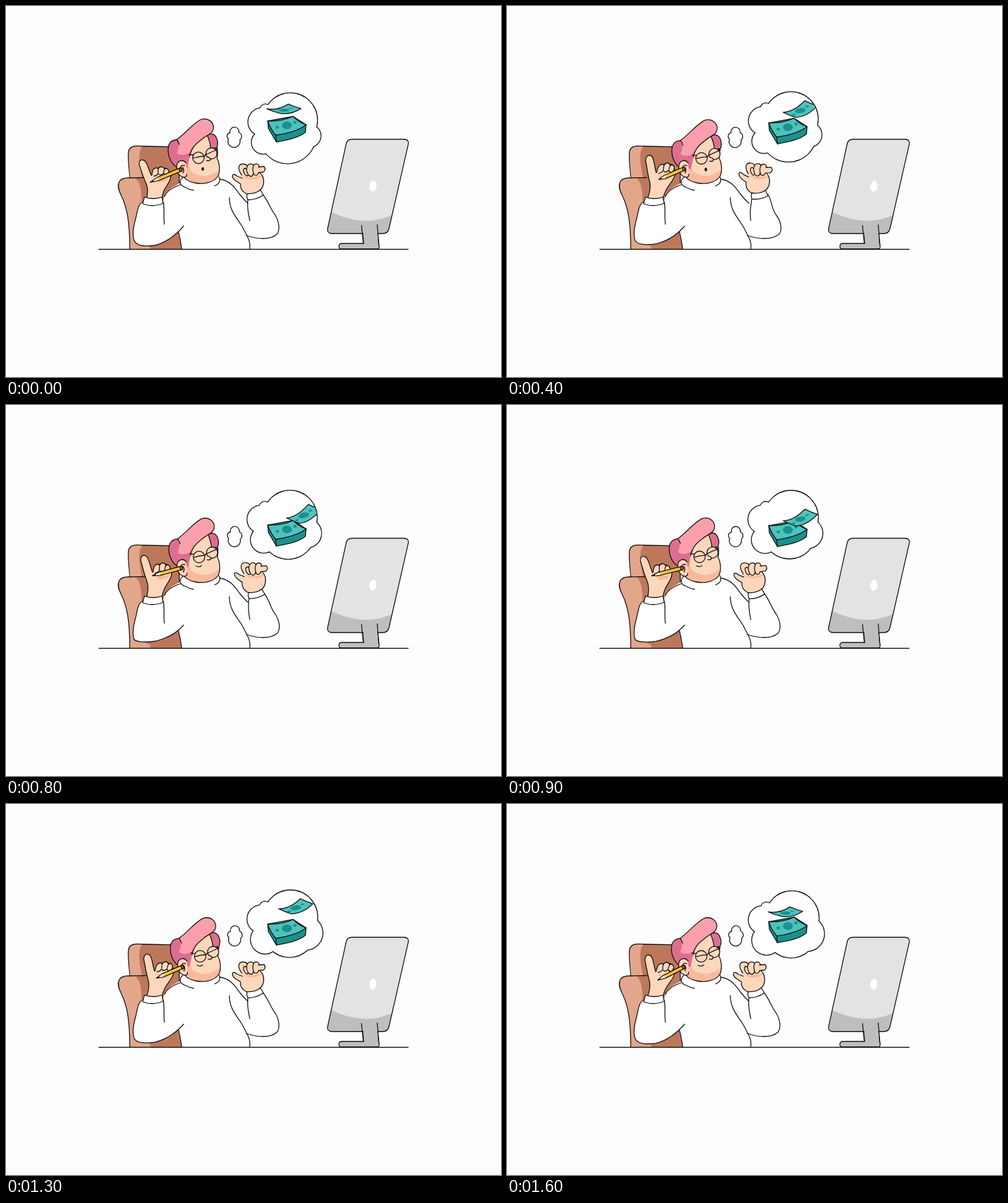
Animation, 800 px wide and 600 px high, one loop 1700 ms. Source, as an HTML page:

```html
<!DOCTYPE html>
<html lang="en">
<head>
<meta charset="utf-8">
<title>Daydream at the desk</title>
<style>
  html, body { margin: 0; width: 100%; height: 100%; overflow: hidden; background: #fdfdfd; }
  svg { display: block; width: 100vw; height: 100vh; }
  .ink { fill: none; stroke: #0b0b0b; stroke-width: 1.3; stroke-linecap: round; stroke-linejoin: round; }
  .w { fill: #fff; }
  .skin { fill: #fdd7bb; }
  .blush { fill: #f9b99c; stroke: none; }
  .pink { fill: #fb9fac; }
  .rose { fill: #dc6f8f; }
  .teal { fill: #4ec2bd; }
  .deep { fill: #1b918c; }
  .tan { fill: #e2a68b; }
  .brown { fill: #bd785c; }
  .grey { fill: #bebebe; }
  .flat { stroke: none; }
</style>
</head>
<body>
<svg viewBox="0 0 800 600">
  <defs>
    <path id="screen" d="M559 215.500H643Q652 216 650 224L619 360Q617 368 609 368H526Q518 367 520 359L550 222Q552 215.500 559 215.500Z"/>
    <path id="skull" d="M280 240L300 224L327 207Q338 212 341 229Q343 237 341 246C346 255 346 270 342 276C335 286 318 289 305 286Q291 283 286 274Z"/>
    <clipPath id="bubbleClip"><path id="bubbleMask"/></clipPath>
    <clipPath id="screenClip"><use href="#screen"/></clipPath>
    <clipPath id="faceClip"><use href="#skull"/></clipPath>
  </defs>
  <g class="ink">
    <!-- chair -->
    <path class="brown" d="M201 290C200 268 196 246 198 235Q200 226.500 211 226.500L280 228V300Z"/>
    <path class="tan flat" d="M201 283C200 268 197.500 246 198.800 236Q201 227.200 211 227.200H220C213 235 215 258 220 278Z"/>
    <path class="brown flat" d="M208 279L226 277.500L290 300V364H278Q282 378 284 393H200L208 360Z"/>
    <path class="tan flat" d="M200 393C200 350 196 326 186 306C181 296 180 290 183 284Q187 278 197 278H208C218 284 219 300 219 318L208 360Q210 380 233 388V393Z"/>
    <path d="M200 393C200 350 196 326 186 306C181 296 180 290 183 284Q187 278 197 278L226 277.500"/>

    <!-- torso -->
    <path class="w flat" d="M282 286C268 293 256 300 254 316L256 356L278 364L284 393H394C395 380 388 365 379 350L361 310L378 306C368 288 360 283 346 279Z"/>
    <path class="w flat" id="armFill"/>
    <path id="armLine"/>
    <path d="M278 362Q282 378 284 393M394 393C396 379 388 370 382 357C371 340 361 330 361 310M282 289C270 293 260 299 256 308"/>
    <path class="w flat" d="M286 275C280 280 280 288 286 291C302 299 330 298 343 286Q348 280 344 273Z"/>
    <path d="M287 276C279 282 280 290 289 293Q296 297 303 298M344 276Q349 286 337 291M346 280C363 283 370 294 378 305Q384 313 391 319"/>

    <!-- head -->
    <g id="face">
      <use href="#skull" class="skin flat"/>
      <path class="blush" clip-path="url(#faceClip)" d="M280 236L296 243Q292 257 300 268C314 279 333 276 346 263V292H280Z"/>
      <path d="M341 229Q343 237 341 246C346 255 346 270 342 276C335 286 318 289 305 286Q291 283 287 276"/>
    </g>
    <g id="hair">
      <path class="rose" d="M325 209Q334 204 339 211Q344 219 341 229L331 231Q330 219 325 209Z"/>
      <path class="rose flat" d="M275 260C264 252 260 238 263 225Q266 217 276 216L312 214Q301 226 297 243L293 262Z"/>
      <path class="pink flat" d="M276 216C290 206 300 192 314 184C327 179 337 189 335 199C334 207 322 210 316 216C305 224 300 230 296 238Q284 244 276 238Q282 227 276 216Z"/>
      <path d="M275 260C264 252 260 238 263 225Q266 217 276 216C290 206 300 192 314 184C327 179 337 189 335 199C334 207 322 210 316 216C305 224 299 231 297 243M276 216Q279 220 280 224"/>
    </g>
    <g id="glasses">
      <circle class="skin" cx="311" cy="245.500" r="9.300"/>
      <circle class="skin" cx="332" cy="238.500" r="9"/>
      <path d="M296 240L303 241M303 246Q312 243 320 243M321 243Q322 240 324 240M324 240Q332 236 342 232L337 231"/>
      <path class="skin" d="M325 244Q331 245 330 249Q328 251 324 250"/>
      <ellipse id="mouthOpen" cx="318" cy="263.500" rx="1.300" ry="2.200" fill="#3c1418"/>
      <path id="mouthSmile" d="M306 260Q312 263 315 259.500"/>
    </g>
    <g id="ear">
      <path class="skin" d="M291 254C286 247 277 250 276 258C275 268 280 277 289 277Q292 276 292 272"/>
      <path class="blush" d="M288 257Q281 256 281 264Q284 272 289 271Z"/>
      <path d="M289 258Q282 256 282 263M285 261Q289 264 286 270"/>
    </g>

    <!-- pencil arm -->
    <path class="w flat" id="sleeveFill"/>
    <path id="sleeveLine"/>
    <g id="hand">
      <path class="skin" d="M227 312C230 300 229 292 226 286C221 275 218 264 215 256Q215 248 221 249C228 250 230 264 235 274L241 266Q249 258 255 262Q262 262 263 269Q268 272 265 281C262 290 253 296 252 312Z"/>
      <path class="blush" d="M238 277Q248 281 264 277Q258 286 246 285Z"/>
      <path class="skin" d="M236 271Q237 261 244 262Q249 264 246 271Q243 275 239 275"/>
      <path class="skin" d="M246 270Q244 260 252 260Q259 263 255 270Q251 275 247 272"/>
      <path class="skin" d="M255 269Q255 262 260 263Q266 267 261 273Q257 275 255 271"/>
    </g>
    <path class="w" d="M224 309Q222 314 221 320Q238 326 254 319L252 309Q238 314 224 309Z"/>
    <g id="pencil">
      <path fill="#fbc43b" d="M0 0L13 -2.800H52Q55 0 52 2.800H13Z"/>
      <path class="flat" fill="#fffaf0" d="M3 0L13 -2.200L14 0L13 2.200Z"/>
      <path class="flat" fill="#0b0b0b" d="M-.5 0L5.500 -1.700V1.700Z"/>
      <path fill="#d8475c" d="M49 -2.800H52Q55 0 52 2.800H49Z"/>
    </g>

    <!-- open hand -->
    <g id="palm">
      <path class="skin flat" d="M390 304C383 300 378 296 379 287C372 283 366 279 366 273Q370 269 376 277L380 274C373 262 376 255 383 255Q389 255 390 259Q393 253 399 255Q409 252 410 259Q421 257 419 265L408 271Q421 276 417 287Q415 295 410 299Z"/>
      <path class="blush" d="M384 275Q396 279 414 273Q411 279 398 280Q388 280 384 275Z"/>
      <path d="M390 304C383 300 378 296 379 287C372 283 365 279 366 273Q368 270 374 275L382 278M381 273C373 262 376 255 383 255Q389 255 391 260"/>
      <path class="skin" d="M385 270Q382 263 386 262Q391 263 392 271Q390 278 385 270Z"/>
      <path class="skin" d="M392 273C386 264 389 254 397 255C403 257 402 266 399 273Q396 277 392 273Z"/>
      <path class="skin" d="M401 272C397 263 399 254 406 255Q412 258 409 268Q406 276 401 272Z"/>
      <path class="skin" d="M408 260L417 259Q421 264 416 268L408 269"/>
      <path d="M411 270Q418 276 416 288Q414 296 408 299"/>
      <path class="w" d="M390 303Q388 308 391 313Q405 313 416 305L411 297Q402 304 390 303Z"/>
    </g>

    <!-- thought -->
    <path id="puff" class="w" d="M362 205A7.400 7.400 0 1 1 376.500 204.500A7 7 0 0 1 378 216.500A9.800 9.800 0 1 1 359.500 215A5.600 5.600 0 0 1 362 205Z"/>
    <path id="bubbleEdge" stroke-width="2.600"/>
    <path id="bubble" class="w flat"/>
    <g clip-path="url(#bubbleClip)">
      <g id="stack">
        <path class="deep" d="M423 186L424 198L437 220C452 217 472 214 484 204L485 192L464 178.500Z"/>
        <path class="teal" d="M423 186Q446 187 464 178.500Q473 188 485 192C474 201 453 207 436 209Q428 200 423 186Z"/>
        <path d="M436 209L437 220"/>
        <g class="deep flat">
          <ellipse cx="454" cy="193" rx="8" ry="6.200"/>
          <ellipse cx="438.500" cy="196" rx="2.800" ry="2.300"/>
          <ellipse cx="467" cy="188" rx="2.800" ry="2.300"/>
        </g>
      </g>
      <path class="teal" id="note"/>
      <g class="deep flat" id="marks">
        <ellipse rx=".19" ry=".27"/>
        <ellipse cx="-.33" cy=".04" rx=".065" ry=".1"/>
        <ellipse cx=".33" cy="-.04" rx=".065" ry=".1"/>
      </g>
    </g>

    <!-- computer and desk -->
    <path class="grey" d="M575 352L578 384H543Q538 384 538 389Q538 393 543 393H599Q604 393 603 388L599 352Z"/>
    <g clip-path="url(#screenClip)">
      <path class="flat" fill="#e3e3e3" d="M515 210H655V372H515Z"/>
      <path class="grey flat" d="M515 328Q580 363 630 335V372H515Z"/>
    </g>
    <use href="#screen"/>
    <path class="grey flat" d="M575.500 353L578.500 375H601L599.500 353Z"/>
    <path d="M574.500 355L577.500 384M600 354L602.500 386"/>
    <ellipse class="flat" fill="#fff" cx="593" cy="291.500" rx="5.800" ry="9" transform="rotate(8 593 291.500)"/>
    <path d="M150 393.500H650"/>
  </g>
</svg>
<script>
const LOOP = 1700, STEP = 100;
const $ = id => document.getElementById(id);
const set = (id, name, value) => $(id).setAttribute(name, value);
const move = (id, x, y) => set(id, 'transform', `translate(${x} ${y})`);
const show = (id, on) => $(id).style.display = on ? '' : 'none';
const wave = (k, period) => (1 - Math.cos(2 * Math.PI * k / period)) / 2;
const disc = ([x, y, r]) => `M${x - r} ${y}a${r} ${r} 0 1 1 ${2 * r} 0a${r} ${r} 0 1 1 ${-2 * r} 0Z`;

// Overlapping lobes: the right one swells while the lower one shrinks
function drawBubble(k) {
  const t = wave(k, 32), lift = Math.sin(Math.PI * k / 16);
  const d = [
    [459.5 + t, 184.5, 43.4],
    [490.5 - 6 * t, 210, 18 + 10 * t],
    [455 + 4 * t, 209 - 2 * t, 45.4 - 4 * t],
    [415.5 + 4 * t, 220.5, 18.4 + 5 * t],
    [414 - t, 187.5, 22.4],
    [419, 167.5, 8.4]
  ].map(disc).join('');
  for (const id of ['bubble', 'bubbleMask', 'bubbleEdge']) {
    set(id, 'd', d);
    move(id, -lift, -2.5 * lift);
  }
  move('puff', t, t);
}

// A note sways down to the stack, then the next one glides in
function drawNote(k) {
  const left = (16 - k) / 5;
  const [x, y] = k < 10
    ? [449 + 37 * wave(k, 13), 166 + 10 * (k / 8) ** 4]
    : [450 + 51 * left ** 2, 174 - 40 * left ** 3];
  const tilt = -7.5 - (x - 449) * .45;
  const [ux, uy, vx, vy] = [35, tilt, 20.5, 6.5 - tilt * .1];
  const spot = (u, v, drop = 0) => `${x + u * ux + v * vx} ${y + u * uy + v * vy + drop} `;
  const sag = 4 - tilt * .1;
  set('note', 'd', 'M' + spot(-.5, -.5)
    + 'C' + spot(-.17, -.5, sag) + spot(.17, -.5, sag) + spot(.5, -.5)
    + 'Q' + spot(.5, 0, 1) + spot(.5, .5)
    + 'C' + spot(.17, .5, sag) + spot(-.17, .5, sag) + spot(-.5, .5)
    + 'Q' + spot(-.5, 0, 1) + spot(-.5, -.5) + 'Z');
  set('marks', 'transform', `matrix(${ux} ${uy} ${vx} ${vy} ${x} ${y + 2.5})`);
}

function drawHead(k, h) {
  move('face', 2 * h, 0);
  move('hair', 4.7 * h, 1.5 * h);
  move('glasses', 3.6 * h, h);
  move('ear', 2 * h, 0);
  show('mouthOpen', k < 6);
  show('mouthSmile', k >= 6);
}

function drawPencilArm(k, h) {
  const dip = wave(k, 16.5);
  const grow = 1 + (4 * dip + 6 * h) / 63, skew = 11 * h / 63;
  set('hand', 'transform', `matrix(1 0 ${-skew} ${grow} ${312 * skew} ${312 * (1 - grow)})`);

  const x = 233 + 13 * h, y = 285 - 9 * dip;
  const dx = 286 + 3 * h - x, dy = 263 - h - y;
  const turn = Math.atan2(dy, dx) * 180 / Math.PI;
  set('pencil', 'transform', `translate(${x} ${y}) rotate(${turn}) scale(${Math.hypot(dx, dy) / 55} 1)`);

  const low = 388 - 5 * dip;
  const outer = `M221 317C214 320 213 328 210 342C206 356 204 371 207 379C211 ${low + 1} 227 ${low + 1} 241 ${low - 1}C258 ${low - 5} 275 370 287 356`;
  set('sleeveFill', 'd', outer + 'L256 353L254 317Z');
  set('sleeveLine', 'd', outer + 'M254 317C257 328 254 340 256 353');
}

function drawOpenArm(k) {
  const r = k < 10 ? wave(k, 10) : 0;
  const x = 5 * r, bulge = 2 * r;
  set('palm', 'transform', `translate(${7 * r} 0.5) rotate(${6 * r} 403 300)`);
  const outer = `M${415 + 1.5 * x} 305C${424 + x} 315 427 328 435 338C${442 + bulge} 350 ${443 + bulge} 362 ${438 + bulge} 369C427 379 405 377 388 371`;
  set('armFill', 'd', outer + `L361 320L366 286L391 319L${391 + x} 311Z`);
  set('armLine', 'd', outer + `M${391 + x} 312C${389 + x} 327 392 337 394 347`);
}

function draw(k) {
  const h = wave(k, 9.7);
  drawHead(k, h);
  drawPencilArm(k, h);
  drawOpenArm(k);
  drawBubble(k);
  drawNote(k);
  move('stack', 0, 9.5 * wave(k, 21));
}

const start = performance.now();
function tick(now) {
  draw(Math.floor(Math.max(0, now - start) % LOOP / STEP));
  requestAnimationFrame(tick);
}
draw(0);
requestAnimationFrame(tick);
</script>
</body>
</html>
```
